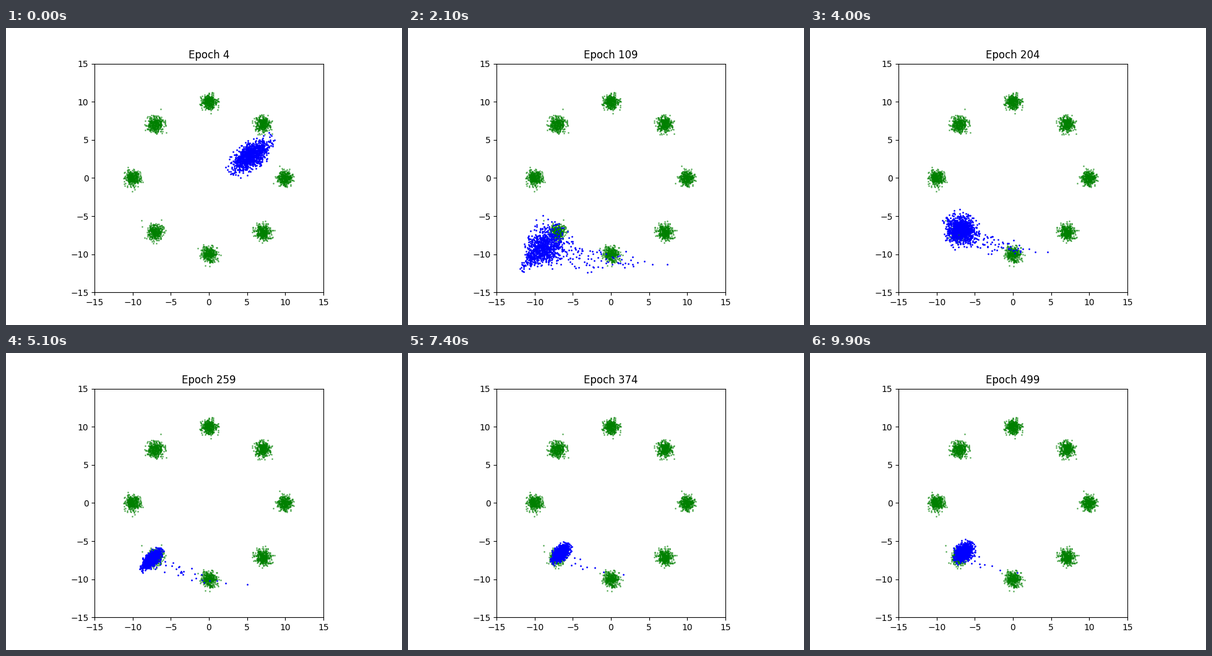
Animation of 640 by 480 pixels, one loop 10 s. Source, as a matplotlib script:

```python
import numpy as np
import matplotlib.pyplot as plt
from matplotlib.animation import FuncAnimation

FRAMES, INTERVAL = 100, 100
N_REAL, N_FAKE = 400, 1000
SETTLED = 30  # step at which the cloud has found its mode
rng = np.random.default_rng(7)

# Real data: eight Gaussian blobs on a ring
theta = np.repeat(np.arange(8) * np.pi / 4, N_REAL)
real = 10 * np.array([np.cos(theta), np.sin(theta)])
real += rng.normal(0, 0.49, real.shape)

# Fixed latent noise for the generated cloud
noise = np.clip(rng.normal(size=(2, N_FAKE)), -2.6, 2.6)
rank = np.arange(N_FAKE)

# Sweep around the ring: step, angle in degrees, radius, spread
STEP, ANGLE, RADIUS, SPREAD = np.array([
    (0, 28, 6.3, 1.4),
    (6, 140, 10.5, 1.4),
    (11, 25, 11, 1.7),
    (13, -39.5, 14.1, 2.0),
    (18, -110, 11.5, 1.8),
    (22, -143, 13.4, 1.4),
    (SETTLED, -135.6, 9.87, 1.0),
    (60, -135.6, 9.87, 0.65),
]).T


def fake_points(step):
    angle, radius, spread = (np.interp(step, STEP, v) for v in (ANGLE, RADIUS, SPREAD))
    late = max(step - SETTLED, 0)
    grow = np.clip((step - 14) / 16, 0, 1)
    orbit = min(late / 4, 1)

    # Ring position, then a steady swing across the final mode
    ring = np.radians(angle)
    turn = 2 * np.pi * 0.115 * (step - 33.8)
    swing = orbit * np.cos(turn)
    cx = radius * np.cos(ring) - 0.55 * swing
    cy = radius * np.sin(ring) - 0.48 * swing

    # Ellipse roughly along the radius, breathing in width
    axis = np.radians(angle + 16 * np.sin(1.35 * ring))
    ratio = 0.5 + 0.3 * grow - 0.35 * orbit * np.cos(2 * np.pi * (step - 51) / 27)
    fan = 0.02 * step * (1 - grow)
    a = spread * noise[0]
    b = spread * ratio * noise[1] * (1 - fan * noise[0])
    dx = np.cos(axis) * a - np.sin(axis) * b
    dy = np.sin(axis) * a + np.cos(axis) * b

    # Low ranks lag behind on a bent tail that thins out over time
    length = grow * (13 + 290 * np.exp(-late / 8)) + 1e-6
    p = np.clip(1 - ((rank + 1e-3) / length) ** 0.4, 0, 1)
    tx = 7.6 - 0.1 * late + 2 * orbit * np.sin(turn)
    ty = -11.3 + orbit * (1.4 - 0.8 * np.cos(turn))
    x = cx + dx * (1 - p ** 2) + (tx - cx) * p
    y = cy + dy * (1 - p ** 2) + (ty - cy) * (1 - (1 - p) ** 2)
    return x, y


fig, ax = plt.subplots(figsize=(6.4, 4.8), dpi=100)
ax.set_aspect("equal")
ticks = np.arange(-15, 16, 5)
ax.set(xlim=(-15, 15), ylim=(-15, 15), xticks=ticks, yticks=ticks)

ax.plot(*real, ".", color="green", ms=2, alpha=0.5)
fake, = ax.plot([], [], ".", color="blue", ms=2)
title = ax.set_title("Epoch 4")


def update(step):
    fake.set_data(*fake_points(step))
    title.set_text(f"Epoch {4 + 5 * step}")
    return fake, title


anim = FuncAnimation(fig, update, frames=FRAMES, interval=INTERVAL, repeat=True)
plt.show()
```
